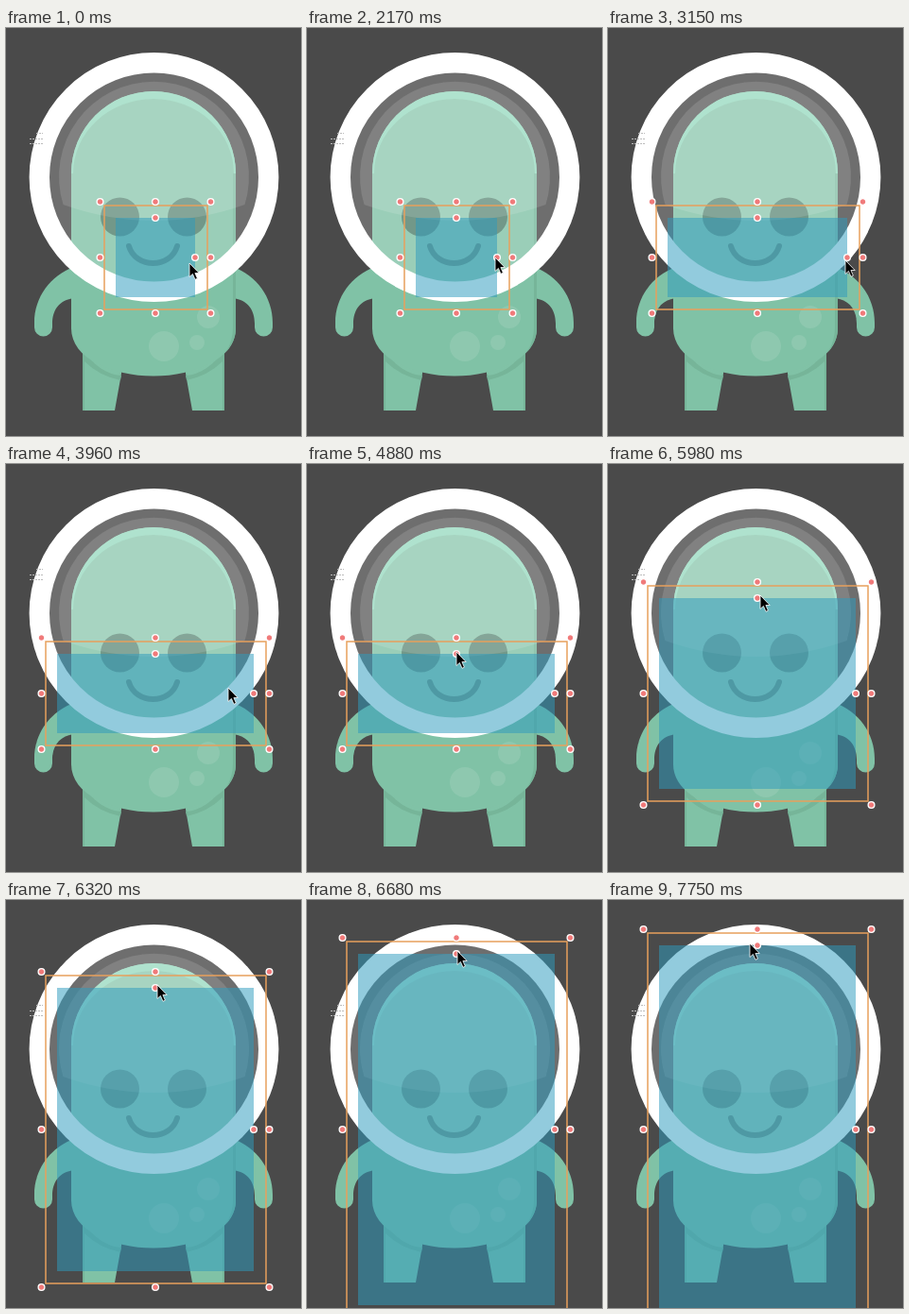
Write an HTML page that moves like this. It is 312 px wide and 432 px high and loops after 7990 ms.

```html
<!DOCTYPE html>
<html lang="en">
<head>
<meta charset="utf-8">
<title>Resizing a shape</title>
<style>
  html, body { margin: 0; width: 100%; height: 100%; overflow: hidden; background: #4a4a4a; }
  svg { display: block; width: 100%; height: 100%; }
</style>
</head>
<body>
<svg viewBox="0 0 312 432">
  <defs>
    <g id="limbs">
      <path fill="#80c2a6" d="M72 253C47 262 30 285 30 312V317a9.500 9.500 0 0 0 19 0V313C49 299 56 288 72 286ZM81 335V405H115L122 366V340Z"/>
      <path fill="#76b599" d="M81 340Q98 366 122 368L121 373Q98 368 83 353V405H81Z"/>
    </g>
    <circle id="handle" r="3.400" fill="#f07a7a" stroke="#fff" stroke-width="1.300"/>
  </defs>

  <!-- body -->
  <use href="#limbs"/>
  <use href="#limbs" transform="matrix(-1 0 0 1 312 0)"/>
  <path fill="#80c2a6" d="M69 154a87 87 0 0 1 174 0V318C243 350 200 368.500 156 368.500S69 350 69 318Z"/>
  <path fill="#8cd6b9" d="M69 154a87 87 0 0 1 174 0h-2a85 79 0 0 0-170 0z"/>
  <path fill="#76b599" d="M240 154h3V318C243 328 239 336 233 343Q240 330 240 318Z"/>
  <g fill="#fff" fill-opacity=".11">
    <circle cx="214" cy="306" r="12"/>
    <circle cx="167" cy="337" r="16"/>
    <circle cx="202" cy="333" r="8"/>
  </g>

  <!-- face -->
  <g fill="#0a1f18" fill-opacity=".42">
    <circle cx="120.500" cy="200" r="20.500"/>
    <circle cx="191.500" cy="200" r="20.500"/>
  </g>
  <path d="M130 231C137 255 174 255 181 231" fill="none" stroke="#0a1f18" stroke-opacity=".42" stroke-width="6" stroke-linecap="round"/>

  <!-- helmet -->
  <circle cx="156.500" cy="158" r="111" fill="#fff" fill-opacity=".2"/>
  <path fill="#fff" fill-opacity=".13" d="M60.500 187A100.500 100.500 0 1 1 252.500 187Q205 204 156.500 204T60.500 187Z"/>
  <circle cx="156.500" cy="158" r="121.200" fill="none" stroke="#fff" stroke-width="21.400"/>
  <path stroke="#bbb" stroke-dasharray="2 1" d="M25 117.500h14M25 122.500h14M32 111.500h7"/>

  <!-- selection -->
  <rect id="fill" fill="#2f9bbe" fill-opacity=".52"/>
  <rect id="frame" fill="none" stroke="#e8a05c" stroke-width="1.500"/>
  <g id="handles"></g>
  <path id="cursor" d="M0 0V14.500L3.400 11.400L6 17.300L8.400 16.200L5.900 10.500H10.200Z" stroke="#fff" stroke-width=".8"/>
</svg>
<script>
const DURATION = 7990;
const CX = 158, CY = 243;
const START_HALF = 42;

const byId = id => document.getElementById(id);
const moveTo = (node, x, y) => node.setAttribute('transform', `translate(${x} ${y})`);
const easeIn = power => p => p ** power;
const easeOut = power => p => 1 - (1 - p) ** power;

// Progress from 0 to 1 between two times.
const ramp = (time, from, to, ease = p => p) =>
  ease(Math.min(1, Math.max(0, (time - from) / (to - from))));

function halfWidth(time) {
  const nudge = time >= 3700 ? 2 : 0;
  return Math.round(START_HALF + 60 * ramp(time, 2150, 3340, easeOut(1.15)) + nudge);
}

function halfHeight(time) {
  return Math.round(START_HALF
    + 106 * ramp(time, 5480, 6300, easeIn(1.2))
    + 63 * ramp(time, 6300, 7110, easeOut(1.45))
    - 16 * ramp(time, 7350, 7750));
}

// The pointer carries the dragged edge and wanders a little on its own.
function cursorPosition(time, w, h) {
  const approach = ramp(time, 10, 230);
  const settle = ramp(time, 420, 550);
  const travel = ramp(time, 3830, 4400);
  const aim = ramp(time, 4590, 4880);
  const pull = ramp(time, 5480, 5980);
  const release = ramp(time, 7350, 7750);
  const x = 194 + 8 * approach - 4 * settle + (w - START_HALF) - 107 * travel
    + 5 * aim + 3 * pull - 2 * ramp(time, 5980, 6680) - 9 * release;
  const y = 249 - 3 * approach - 3 * settle + 5 * ramp(time, 2150, 3700) - 48 * travel
    - aim - (h - START_HALF) - pull + release;
  return [Math.round(x), Math.round(y)];
}

function placeRect(id, left, top, right, bottom) {
  const box = { x: left, y: top, width: right - left, height: bottom - top };
  for (const name in box) byId(id).setAttribute(name, box[name]);
}

const handles = Array.from({ length: 10 }, () => {
  const use = document.createElementNS('http://www.w3.org/2000/svg', 'use');
  use.setAttribute('href', '#handle');
  return byId('handles').appendChild(use);
});

function draw(time) {
  const w = halfWidth(time), h = halfHeight(time);
  placeRect('fill', CX - w, CY - h, CX + w, CY + h);
  placeRect('frame', CX - w - 12, CY - h - 13, CX + w + 13, CY + h + 13);

  const spots = [[w, 0], [0, -h]];
  for (const i of [-1, 0, 1])
    for (const j of [-1, 0, 1])
      if (i || j) spots.push([i * (w + 16.5), j * (h + 17)]);
  spots.forEach(([x, y], i) => moveTo(handles[i], CX + x, CY + y));

  moveTo(byId('cursor'), ...cursorPosition(time, w, h));
}

function tick() {
  draw(performance.now() % DURATION);
  requestAnimationFrame(tick);
}
tick();
</script>
</body>
</html>
```
